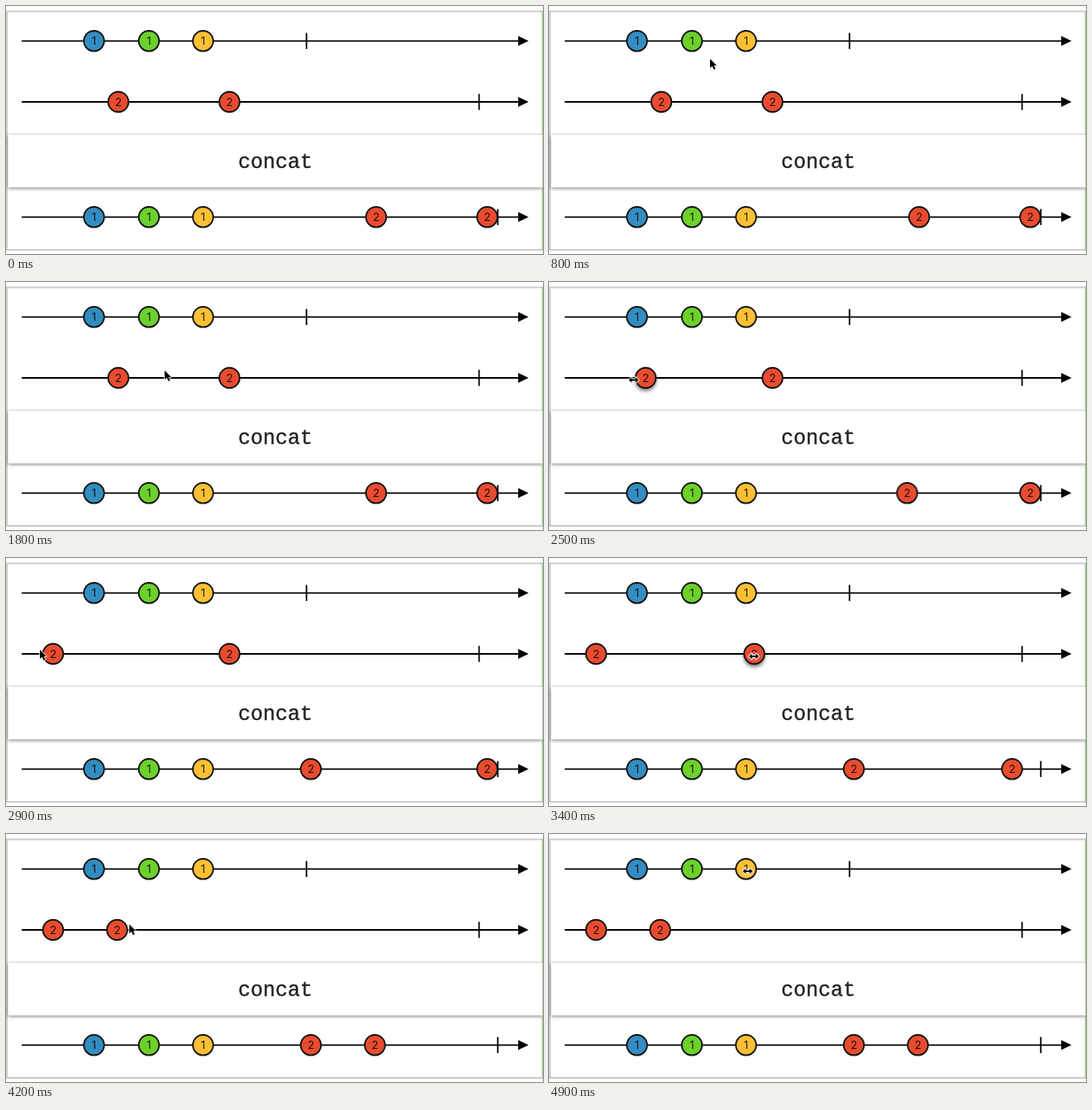
An HTML page that plays this animation: 650 by 300 pixels, repeating every 5 s.

```html
<!DOCTYPE html>
<html lang="en">
<head>
<meta charset="utf-8">
<title>concat marble diagram</title>
<style>
html, body { margin: 0; width: 100%; height: 100%; overflow: hidden; background: #fff; }
svg { display: block; width: 650px; height: 300px; }
.digit { font: 13.5px Inter, "Liberation Sans", sans-serif; text-anchor: middle; fill: #000; fill-opacity: .82; }
.label { font: 25px "Liberation Mono", "Courier New", monospace; text-anchor: middle; fill: #222; stroke: #222; stroke-width: .35; }
.panel { fill: #fff; filter: drop-shadow(0 1px 2px rgba(0, 0, 0, .55)); }
.shade { fill: #000; opacity: 0; filter: blur(2px); }

/* One step is 100 ms, which is 2% of the loop. */
.first, .firstOut, .second, .shade, .cursor, .arrow, .resize {
  animation: 5s step-end infinite;
}
.first { animation-name: first; }
.firstOut { animation-name: firstOut; }
.second { animation-name: second; }
.first .shade { animation-name: hold1; }
.second .shade { animation-name: hold2; }
.cursor { animation-name: roam; }
.arrow { animation-name: arrow; }
.resize { animation-name: resize; }

@keyframes first {
  0% { transform: translateX(0); }
  48% { transform: translateX(-6px); }
  50% { transform: translateX(-19px); }
  52% { transform: translateX(-40px); }
  54% { transform: translateX(-60px); }
  56% { transform: translateX(-74px); }
  58%, 100% { transform: translateX(-79px); }
}
@keyframes firstOut {
  0% { transform: translateX(0); }
  48% { transform: translateX(-3px); }
  50% { transform: translateX(-14.5px); }
  52% { transform: translateX(-35px); }
  54% { transform: translateX(-56px); }
  56% { transform: translateX(-72px); }
  58%, 100% { transform: translateX(-79px); }
}
@keyframes second {
  0% { transform: translateX(0); }
  68% { transform: translateX(-22px); }
  70% { transform: translateX(-63px); }
  72% { transform: translateX(-103px); }
  74% { transform: translateX(-125px); }
  76% { transform: translateX(-132px); }
  78%, 100% { transform: translateX(-136px); }
}
@keyframes hold1 { 0% { opacity: 0; } 46% { opacity: .5; } 58%, 100% { opacity: 0; } }
@keyframes hold2 { 0% { opacity: 0; } 66% { opacity: .5; } 80%, 100% { opacity: 0; } }

@keyframes roam {
  0% { transform: translate(199px, 34px); }
  12% { transform: translate(199px, 34px); animation-timing-function: steps(2); }
  16% { transform: translate(195px, 64px); animation-timing-function: steps(3); }
  22% { transform: translate(198px, 268px); animation-timing-function: steps(7); }
  36% { transform: translate(192px, 107px); animation-timing-function: steps(3); }
  42% { transform: translate(136px, 118px); }
  46% { transform: translate(134px, 119px); }
  48% { transform: translate(124px, 119px); }
  50% { transform: translate(102.5px, 118.5px); }
  52% { transform: translate(80px, 118px); }
  54% { transform: translate(60px, 117px); }
  56% { transform: translate(46px, 115px); }
  58% { transform: translate(41px, 111px); }
  62% { transform: translate(41px, 111px); animation-timing-function: steps(2); }
  66% { transform: translate(270px, 119px); }
  68% { transform: translate(248px, 119px); }
  70% { transform: translate(207px, 119px); }
  72% { transform: translate(167px, 119px); }
  74% { transform: translate(145px, 120px); }
  76% { transform: translate(138px, 120px); }
  78% { transform: translate(134px, 120px); }
  82% { transform: translate(134px, 120px); animation-timing-function: steps(7); }
  96%, 100% { transform: translate(240.5px, 45px); }
}
@keyframes arrow {
  0% { opacity: 0; }
  12% { opacity: 1; }
  42% { opacity: 0; }
  58% { opacity: 1; }
  66% { opacity: 0; }
  84% { opacity: 1; }
  96%, 100% { opacity: 0; }
}
@keyframes resize {
  0% { opacity: 0; }
  42% { opacity: 1; }
  58% { opacity: 0; }
  66% { opacity: 1; }
  84% { opacity: 0; }
  96%, 100% { opacity: 1; }
}
</style>
</head>
<body>
<svg viewBox="0 0 650 300">
  <defs>
    <circle id="disc" r="12.3" stroke="#111" stroke-width="1.9"/>
    <g id="one"><use href="#disc"/><text class="digit" y="4.8">1</text></g>
    <g id="two" fill="#e84c30"><use href="#disc"/><text class="digit" y="4.8">2</text></g>
    <g id="axis">
      <path d="M19 0H622" stroke="#000" stroke-width="1.8"/>
      <path d="M620 -6L632.5 0L620 6Z"/>
    </g>
    <path id="end" d="M0 -9.7V9.7" stroke="#000" stroke-width="1.8"/>
    <g id="ones">
      <use href="#one" x="106.5" fill="#338dc0"/>
      <use href="#one" x="173" fill="#6dd12c"/>
      <use href="#one" x="238.5" fill="#fbc034"/>
    </g>
  </defs>

  <rect width="650" height="300" fill="#fff"/>
  <path d="M650 6.5H1V295H650" fill="none" stroke="#cbcbcb" stroke-width="2"/>
  <path d="M649.3 6V295" stroke="#9bd48d" stroke-width="1.4"/>

  <use href="#axis" y="42.3"/>
  <use href="#end" x="363.7" y="42.3"/>
  <use href="#ones" y="42.3"/>

  <use href="#axis" y="116"/>
  <use href="#end" x="572.6" y="116"/>
  <g class="second">
    <circle class="shade" cx="270.5" cy="119" r="13"/>
    <use href="#two" x="270.5" y="116"/>
  </g>
  <g class="first">
    <circle class="shade" cx="136" cy="119" r="13"/>
    <use href="#two" x="136" y="116"/>
  </g>

  <rect class="panel" x="2.5" y="156" width="647" height="63.5"/>
  <text class="label" x="326" y="196">concat</text>

  <use href="#axis" y="255.3"/>
  <use href="#ones" y="255.3"/>
  <g class="second"><use href="#two" x="582.5" y="255.3"/></g>
  <g class="firstOut"><use href="#two" x="448" y="255.3"/></g>
  <use href="#end" x="595.3" y="255.3"/>

  <g class="cursor" stroke="#fff" stroke-linejoin="round" paint-order="stroke">
    <path class="arrow" stroke-width="1.6" d="M0 0V11L2.6 8.7L4.6 13L6.6 12.1L4.7 8H8Z"/>
    <path class="resize" stroke-width="2" d="M-6 0L-2.4 -3.6V-1H2.4V-3.6L6 0L2.4 3.6V1H-2.4V3.6Z"/>
  </g>
</svg>
</body>
</html>
```
